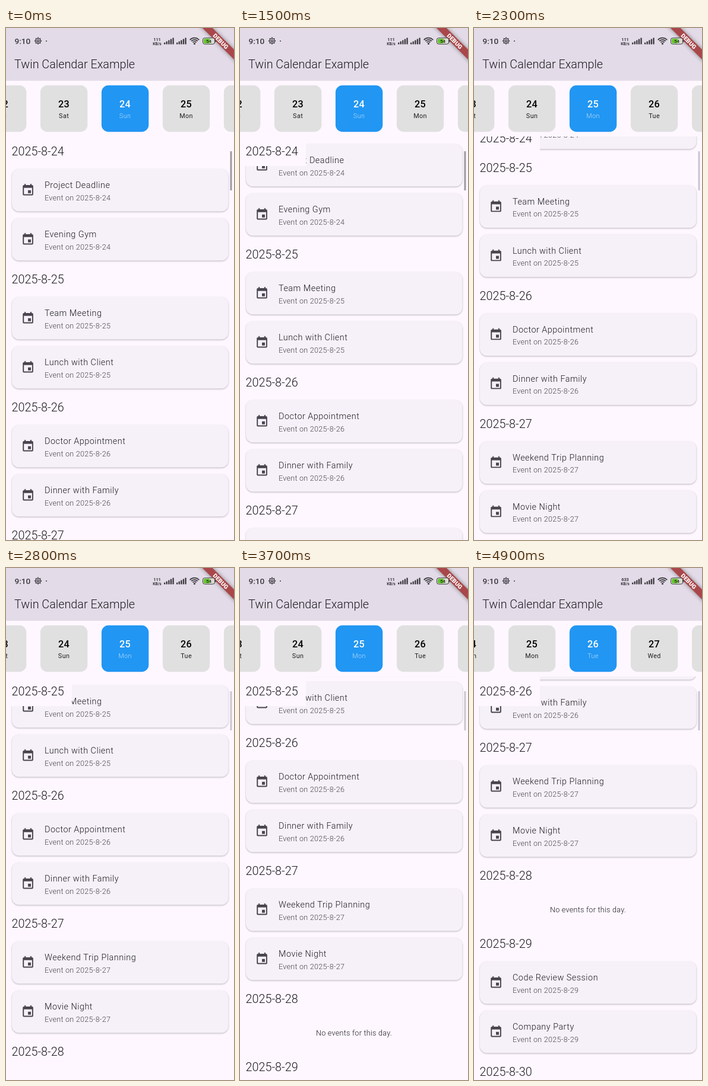
These frames come from a looping animation (384 px wide and 864 px high, 5 s). An HTML page with a canvas:

```html
<!DOCTYPE html>
<html lang="en">
<head>
<meta charset="utf-8">
<title>Twin Calendar Example</title>
<style>
  html, body { margin: 0; width: 100%; height: 100%; overflow: hidden; background: #fef7ff; }
  canvas { display: block; width: 384px; height: 864px; }
</style>
</head>
<body>
<canvas id="stage"></canvas>
<script>
const W = 384, H = 864, LOOP = 5000, TICK = 100;
const BG = '#fef7ff', BAR = '#e3dce8', INK = '#1d1b20', MUTED = '#49454f', STATUS = '#3a373d';
const LIST_TOP = 183, HEADER_H = 50, SECTION_H = 216, EMPTY_H = 115;
const WEEK = ['Sun', 'Mon', 'Tue', 'Wed', 'Thu', 'Fri', 'Sat'];
const EVENTS = {
  24: ['Project Deadline', 'Evening Gym'],
  25: ['Team Meeting', 'Lunch with Client'],
  26: ['Doctor Appointment', 'Dinner with Family'],
  27: ['Weekend Trip Planning', 'Movie Night'],
  28: [],
  29: ['Code Review Session', 'Company Party'],
  30: []
};
// [time, list scroll]: four swipes, each slowing to rest
const SCROLL = [
  [1300, 0], [1400, 8], [1500, 42], [1600, 86], [1700, 122], [1800, 149],
  [1900, 167], [2000, 178], [2100, 184.5], [2200, 187.5], [2300, 188.2],
  [2500, 188.2], [2600, 195], [2700, 222], [2800, 256], [2900, 284],
  [3000, 302], [3100, 310], [3500, 310],
  [3600, 317], [3700, 345], [3800, 382], [3900, 417], [4000, 445],
  [4100, 463.4], [4200, 470], [4300, 471.5],
  [4600, 471.5], [4700, 484], [4800, 520], [4900, 553]
];
const PICKS = [1860, 3836];   // moments the next day gets selected
const SLIDE = 300;

const ICON = new Path2D('M17 12h-5v5h5v-5zM16 1v2H8V1H6v2H5c-1.11 0-1.99.9-1.99 2L3 19c0 1.1.89 2 2 2h14c1.1 0 2-.9 2-2V5c0-1.1-.9-2-2-2h-1V1h-2zm3 18H5V8h14v11z');

const canvas = document.getElementById('stage');
const ctx = canvas.getContext('2d');
const dpr = window.devicePixelRatio || 1;
canvas.width = W * dpr;
canvas.height = H * dpr;

const clamp = v => Math.min(1, Math.max(0, v));
const ease = v => v < 0.5 ? 2 * v * v : 1 - 2 * (1 - v) ** 2;

function track(points, t) {
  if (t <= points[0][0]) return points[0][1];
  for (let i = 1; i < points.length; i++) {
    const [t0, a] = points[i - 1], [t1, b] = points[i];
    if (t <= t1) return a + (b - a) * (t - t0) / (t1 - t0);
  }
  return points[points.length - 1][1];
}

function rect(x, y, w, h, color, r = 0) {
  ctx.fillStyle = color;
  ctx.beginPath();
  ctx.roundRect(x, y, w, h, r);
  ctx.fill();
}

function text(str, x, y, size, color, { weight = 300, gap = 0, align = 'left' } = {}) {
  ctx.font = `${weight} ${size}px Roboto, sans-serif`;
  ctx.letterSpacing = gap + 'px';
  ctx.textAlign = align;
  ctx.fillStyle = color;
  ctx.fillText(str, x, y);
}

function shadow(color, blur, dy) {
  ctx.shadowColor = color;
  ctx.shadowBlur = blur * dpr;
  ctx.shadowOffsetY = dy * dpr;
}

function card(title, date, y) {
  ctx.save();
  shadow('rgba(0,0,0,.28)', 2.5, 0.9);
  rect(10, y, 364.5, 71.5, '#f6f0f8', 12);
  ctx.restore();
  ctx.save();
  ctx.translate(25.3, y + 24);
  ctx.scale(0.978, 0.978);
  ctx.fillStyle = MUTED;
  ctx.fill(ICON);
  ctx.restore();
  text(title, 65, y + 32.4, 14.4, INK, { gap: 0.5 });
  text('Event on ' + date, 65, y + 52.6, 12.6, MUTED, { gap: 0.25 });
}

function list(scroll) {
  ctx.save();
  ctx.beginPath();
  ctx.rect(0, LIST_TOP, W, H - LIST_TOP);
  ctx.clip();
  let top = LIST_TOP - scroll;
  for (const [day, items] of Object.entries(EVENTS)) {
    const date = '2025-8-' + day;
    const height = items.length ? SECTION_H : EMPTY_H;
    if (top + height > LIST_TOP && top < H) {
      items.forEach((title, i) => card(title, date, top + 55 + i * 83));
      if (!items.length) {
        text('No events for this day.', W / 2, top + 87, 12.6, INK, { gap: 0.25, align: 'center' });
      }
      // the header sticks until its section runs out
      const y = Math.min(Math.max(top, LIST_TOP), top + height - HEADER_H);
      rect(0, y, 111, HEADER_H, BG);
      text(date, 9.5, y + 32, 19.8, INK);
    }
    top += height;
  }
  ctx.restore();
}

function strip(t) {
  const chosen = 24 + PICKS.filter(p => t >= p).length;
  const shift = PICKS.reduce((sum, p) => sum + ease(clamp((t - p) / SLIDE)), 0);
  for (let day = 21; day <= 29; day++) {
    const x = 160.9 + (day - 24 - shift) * 103;
    if (x > W || x < -80) continue;
    const on = day === chosen;
    rect(x, 96.7, 79.4, 78.5, on ? '#2196f3' : '#e0e0e0', 11.7);
    text(day, x + 39.7, 134, 16.2, on ? '#fff' : '#000', { weight: 500, gap: 0.3, align: 'center' });
    text(WEEK[(day - 24 + 7) % 7], x + 39.7, 152, 10.8, on ? 'rgba(255,255,255,.7)' : '#1f1f1f',
      { weight: on ? 300 : 400, gap: 0.4, align: 'center' });
  }
}

function banner() {
  ctx.save();
  ctx.translate(W, 0);
  ctx.rotate(Math.PI / 4);
  shadow('rgba(0,0,0,.45)', 7, 0);
  rect(-60, 25.7, 120, 11.8, '#a9474a');
  shadow('transparent', 0, 0);
  text('DEBUG', 0, 35.2, 10, '#fff', { weight: 900, align: 'center' });
  ctx.restore();
}

function gear(x, y) {
  ctx.strokeStyle = STATUS;
  ctx.lineWidth = 1.4;
  ctx.beginPath();
  ctx.arc(x, y, 4.3, 0, Math.PI * 2);
  ctx.moveTo(x + 1.8, y);
  ctx.arc(x, y, 1.8, 0, Math.PI * 2);
  for (let i = 0; i < 8; i++) {
    const a = i * Math.PI / 4, c = Math.cos(a), s = Math.sin(a);
    ctx.moveTo(x + c * 4.3, y + s * 4.3);
    ctx.lineTo(x + c * 6.1, y + s * 6.1);
  }
  ctx.stroke();
}

function signal(x) {
  for (let i = 0; i < 5; i++) {
    const h = 3 + i * 2;
    rect(x + i * 3.6, 27.5 - h, 2.3, h, STATUS, 0.6);
  }
}

function wifi(x, y) {
  ctx.strokeStyle = STATUS;
  ctx.lineWidth = 1.8;
  for (const r of [4.2, 7.4, 10.6]) {
    ctx.beginPath();
    ctx.arc(x, y, r, -Math.PI * 0.76, -Math.PI * 0.24);
    ctx.stroke();
  }
  ctx.fillStyle = STATUS;
  ctx.beginPath();
  ctx.arc(x, y - 0.8, 1.6, 0, Math.PI * 2);
  ctx.fill();
}

function battery() {
  rect(331.5, 16.8, 20, 10.4, '#d9dcd2', 3);
  rect(333, 18.3, 10.5, 7.4, '#63c728', 1.5);
  ctx.strokeStyle = STATUS;
  ctx.lineWidth = 1;
  ctx.beginPath();
  ctx.roundRect(331.5, 16.8, 20, 10.4, 3);
  ctx.stroke();
  rect(352.4, 20, 1.4, 4, STATUS, 0.7);
  text('54', 341.5, 25, 8, '#2b2b2b', { weight: 500, align: 'center' });
}

function statusBar(t) {
  text('9:10', 14.5, 27, 13.6, STATUS, { weight: 500 });
  gear(54, 21.7);
  rect(67, 21, 2, 2, STATUS, 1);
  text(t < 3900 ? '111' : '633', 254.5, 22, 7.4, STATUS, { weight: 700, align: 'center' });
  text('KB/s', 254.5, 28.6, 6.8, STATUS, { weight: 700, align: 'center' });
  signal(266);
  signal(287);
  wifi(317.5, 27.3);
  battery();
}

function draw(t) {
  ctx.setTransform(dpr, 0, 0, dpr, 0, 0);
  rect(0, 0, W, H, BG);
  list(track(SCROLL, t));
  const thumb = track([[1800, 0.38], [2100, 0.2]], t);
  rect(377.5, 208, 3, 66, `rgba(0,0,0,${thumb})`, 0.5);
  strip(t);
  rect(0, 0, W, 89, BAR);
  text('Twin Calendar Example', 14, 68, 19.8, INK);
  banner();
  statusBar(t);
}

const start = performance.now();
function frame(now) {
  const t = Math.max(0, now - start) % LOOP;
  draw(Math.floor(t / TICK) * TICK);   // ten steps a second
  requestAnimationFrame(frame);
}
draw(0);
requestAnimationFrame(frame);
</script>
</body>
</html>
```
